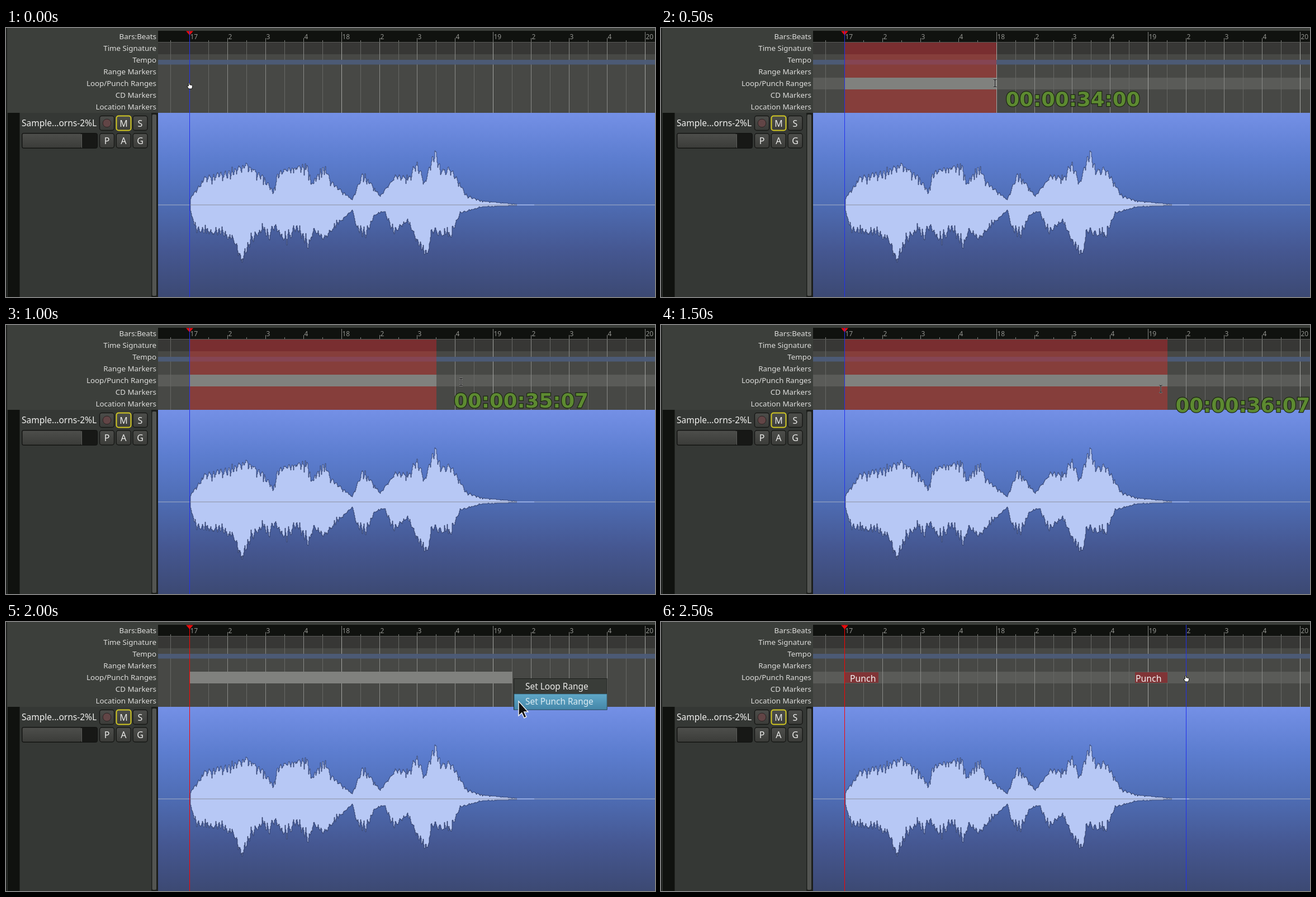
Recreate the animation shown at these times as an HTML page. Size 1161x482 px, loop 3000 ms.

```html
<!DOCTYPE html>
<html lang="en">
<head>
<meta charset="utf-8">
<title>Setting a punch range</title>
<style>
html, body { margin: 0; width: 100%; height: 100%; overflow: hidden; background: #3c3f3b; }
svg { display: block; width: 1161px; height: 482px; font-family: "Noto Sans", "Open Sans", sans-serif; }
.clock { font: bold 35.6px "DejaVu Sans", sans-serif; }
</style>
</head>
<body>
<svg id="stage" viewBox="0 0 1161 482">
  <defs>
    <linearGradient id="region" x1="0" y1="0" x2="0" y2="1">
      <stop offset="0" stop-color="#7490e6"/>
      <stop offset=".25" stop-color="#5c7dcf"/>
      <stop offset=".5" stop-color="#4e6cb3"/>
      <stop offset=".75" stop-color="#455791"/>
      <stop offset="1" stop-color="#3c4973"/>
    </linearGradient>
    <linearGradient id="button" x1="0" y1="0" x2="0" y2="1">
      <stop offset="0" stop-color="#4d4e4b"/><stop offset="1" stop-color="#3b3c39"/>
    </linearGradient>
    <linearGradient id="active" x1="0" y1="0" x2="0" y2="1">
      <stop offset="0" stop-color="#60a8c8"/><stop offset="1" stop-color="#4486a8"/>
    </linearGradient>
  </defs>
</svg>
<script>
const stage = document.getElementById('stage');
const LEFT = 272, RIGHT = 1161, BAR17 = 328.7, BEAT = 67.88, AXIS = 317;
const WAVE_START = 330, WAVE_END = 914;

function el(tag, attrs, parent = stage, text) {
  const node = document.createElementNS('http://www.w3.org/2000/svg', tag);
  for (const key in attrs) node.setAttribute(key, attrs[key]);
  if (text) node.textContent = text;
  return parent.appendChild(node);
}
const rect = (x, y, width, height, fill, parent, more) =>
  el('rect', { x, y, width, height, fill, ...more }, parent);
const label = (x, y, text, size, fill, parent, more) =>
  el('text', { x, y, 'font-size': size, fill, ...more }, parent, text);
const vline = (x, y, bottom, fill, parent) => rect(x, y, 1, bottom - y, fill, parent);
const group = () => el('g', {});
const show = (node, on) => node.setAttribute('display', on ? 'inline' : 'none');

function drawRulers() {
  rect(0, 0, 2, 482, '#1f211f');
  ['Bars:Beats', 'Time Signature', 'Tempo', 'Range Markers', 'Loop/Punch Ranges',
    'CD Markers', 'Location Markers'].forEach((name, i) =>
    label(269, 20 + 21 * i, name, 13.33, '#dededc', stage, { 'text-anchor': 'end' }));
  rect(LEFT, 5, RIGHT - LEFT, 21, '#10120f');
  rect(LEFT, 26, RIGHT - LEFT, 21, '#373735');
  rect(LEFT, 47, RIGHT - LEFT, 105, '#474845');
}

function drawGrid() {
  for (let half = -1; half < 25; half++) {
    const x = Math.round(BAR17 + half * BEAT / 2 - .5);
    const bar = half % 8 === 0, beat = half % 2 === 0;
    vline(x, 26, 152, bar ? '#a3a4a1' : beat ? '#898a87' : '#666764');
    vline(x, bar ? 7 : beat ? 18 : 22, 26, '#858683');
    if (beat) label(x + 1.5, 20, String(bar ? 17 + half / 8 : half / 2 % 4 + 1), 12, '#92938f');
  }
  rect(LEFT, 25, RIGHT - LEFT, 1, '#5b5c59');
}

function button(x, y, letter, border = '#171816', weight = 1.4) {
  rect(x, y, 26, 26, 'url(#button)', stage, { rx: 4, stroke: border, 'stroke-width': weight });
  if (letter) label(x + 13, y + 19, letter, 16, '#ececea', stage, { 'text-anchor': 'middle' });
}

function drawTrack() {
  rect(2, 152, 270, 330, '#353835');
  rect(3, 152, 21.5, 330, '#10120f');
  rect(260, 152, 12, 330, '#1c1e1b');
  rect(261.5, 155, 7.5, 325, '#535552', stage, { rx: 2 });
  label(28, 176, 'Sample...orns-2%L', 15.5, '#f0f0ee');
  button(167.5, 157.5);
  el('circle', { cx: 180.5, cy: 170.5, r: 7.3, fill: '#624546', stroke: '#2c2222' });
  button(197.5, 157.5, 'M', '#d2c822', 2);
  button(227, 157.5, 'S');
  ['P', 'A', 'G'].forEach((letter, i) => button(167.5 + 29.8 * i, 189, letter));
  rect(28.5, 188.5, 135, 27, '#171816', stage, { rx: 3, stroke: '#111210' });
  rect(29.5, 189.5, 105.5, 25, 'url(#button)', stage, { rx: 2 });
  vline(135, 190, 215, '#5d5e5b');
}

// Main swells of the sound as [x, height].
const upperSwells = [[330, 14], [356, 54], [388, 62], [430, 78], [462, 52], [478, 26], [486, 64],
  [506, 70], [538, 76], [547, 42], [569, 76], [580, 46], [619, 10], [638, 62], [669, 17], [697, 56],
  [722, 54], [733, 86], [749, 44], [767, 108], [777, 66], [795, 72], [822, 20], [850, 8], [914, 1]];
const lowerSwells = [[330, 14], [341, 52], [386, 56], [407, 68], [420, 110], [437, 74], [460, 48],
  [470, 66], [480, 44], [502, 73], [520, 46], [540, 84], [550, 48], [567, 66], [619, 10], [629, 52],
  [644, 62], [658, 20], [676, 13], [693, 56], [718, 30], [737, 76], [752, 98], [762, 54], [796, 60],
  [812, 16], [850, 4], [914, 1]];

function random(seed) {
  return () => (seed = seed * 16807 % 2147483647) / 2147483647;
}

function heightAt(swells, x) {
  const i = swells.findIndex(point => point[0] > x);
  const [x0, h0] = swells[i - 1], [x1, h1] = swells[i];
  return h0 + (h1 - h0) * (x - x0) / (x1 - x0);
}

// Cuts random notches into the swells; side is -1 above the axis and 1 below.
function outline(swells, side, seed) {
  const next = random(seed), steps = [];
  let x = WAVE_START;
  while (x < WAVE_END) {
    const width = 4 + Math.floor(next() * 6), depth = .08 + next() * .24;
    for (let i = 0; i < width && x < WAVE_END; i++, x++) {
      const notch = Math.abs(2 * i / width - 1) * depth + next() * .06;
      const y = Math.round(AXIS + side * heightAt(swells, x) * (1 - notch));
      steps.push([x, y], [x + 1, y]);
    }
  }
  return steps;
}

function drawRegion() {
  rect(LEFT, 152, RIGHT - LEFT, 330, 'url(#region)');
  rect(LEFT, AXIS - .5, RIGHT - LEFT, 1, '#a6afc6');
  const top = outline(upperSwells, -1, 71), bottom = outline(lowerSwells, 1, 193);
  el('path', { d: 'M' + top.concat(bottom.reverse()).join('L') + 'Z', fill: '#b7c8f5',
    stroke: '#172140', 'stroke-width': .8, 'stroke-opacity': .75 });
  rect(WAVE_END, 316, 31, 2, '#94a9df');
  rect(WAVE_START, AXIS - .5, WAVE_END - WAVE_START, 1, '#8b929f');
}

function beamCursor() {
  const g = group(), d = 'M-3-6.5H-1L0-5.5L1-6.5H3M0-5.5V5.5M-3 6.5H-1L0 5.5L1 6.5H3';
  el('path', { d, fill: 'none', stroke: '#bbb', 'stroke-width': 2.2 }, g);
  el('path', { d, fill: 'none', stroke: '#111', 'stroke-width': 1.2 }, g);
  return g;
}

function handCursor() {
  const g = group();
  el('path', { d: 'M-2.5 0V-5Q-1.5-7 -.5-5V-2.5L3.5-1.5Q5-1 4.5 1.5L3.5 5H-2L-4.8 1Q-5-1-2.5 0Z',
    fill: '#fff', stroke: '#111' }, g);
  return g;
}

function drawMenu() {
  const g = group();
  rect(908.5, 101.5, 166.5, 55.5, '#393c38', g, { stroke: '#1d1f1c' });
  rect(909, 129, 166, 28, 'url(#active)', g, { stroke: '#2d5a70', 'stroke-width': .7 });
  label(929, 120.5, 'Set Loop Range', 15.4, '#ececea', g);
  label(929, 148, 'Set Punch Range', 15.4, '#dcebf2', g);
  el('path', { d: 'M917 142V168L922.7 162.7L927 172L931 170L926.8 161H934Z',
    fill: '#111', stroke: '#f5f5f5', 'stroke-width': 1.4 }, g);
  return g;
}

function drawMarkers() {
  const g = group();
  for (const [x, width, textX] of [[329, 60, 338], [848, 58, 849]]) {
    rect(x, 90, width, 19, '#803436', g);
    label(textX, 107, 'Punch', 15.8, '#f4f4f4', g);
  }
  return g;
}

drawRulers();
const highlight = rect(LEFT, 89, RIGHT - LEFT, 21, '#5a5b58');
drawGrid();
rect(LEFT, 57, RIGHT - LEFT, 8.5, '#4c5b78', stage, { 'fill-opacity': .95 });
const drag = group();
const dragFills = [[26, 21, '#792e30'], [47, 105, '#863e3b'], [57, 8.5, '#854553']]
  .map(([y, height, fill]) => rect(329, y, 0, height, fill, drag));
const range = rect(329, 89, 0, 21, '#80817e');
drawTrack();
drawRegion();
const markers = drawMarkers();
vline(328, 5, 482, '#f00');
el('path', { d: 'M322 5.5H335L328.5 13Z', fill: '#e80b0d' });
const hoverLine = vline(0, 5, 482, '#2230ec');
const clock = label(0, 0, '', 36, '#5d8a31', stage,
  { class: 'clock', stroke: '#1b2612', 'stroke-width': 2.4, 'paint-order': 'stroke' });
const beam = beamCursor(), hand = handCursor(), menu = drawMenu();

const poses = [
  { hover: 328, hand: [329, 104] },
  { hover: 328, end: 600, beam: [597.5, 99], clock: [616.5, 139.5, '00:00:34:00'], lit: true },
  { hover: 328, end: 770, beam: [814, 102], clock: [801.3, 147.5, '00:00:35:07'], lit: true },
  { hover: 328, end: 906, beam: [894, 114.5], clock: [920.5, 155.5, '00:00:36:07'], lit: true },
  { end: 906, menu: true },
  { hover: 939, hand: [940, 102], lit: true, markers: true }
];

function place(node, point) {
  show(node, point);
  if (point) node.setAttribute('transform', `translate(${point[0]} ${point[1]})`);
}

function render(time) {
  const pose = poses[Math.floor(time % 3000 / 500)];
  const width = pose.end ? pose.end - 329 : 0;
  for (const node of [...dragFills, range]) node.setAttribute('width', width);
  show(drag, pose.beam);
  show(range, pose.end);
  show(highlight, pose.lit);
  show(menu, pose.menu);
  show(markers, pose.markers);
  place(hoverLine, pose.hover && [pose.hover, 0]);
  place(beam, pose.beam);
  place(hand, pose.hand);
  place(clock, pose.clock);
  if (pose.clock) clock.textContent = pose.clock[2];
}

const start = performance.now();
function tick() {
  render(performance.now() - start);
  requestAnimationFrame(tick);
}
tick();
</script>
</body>
</html>
```
